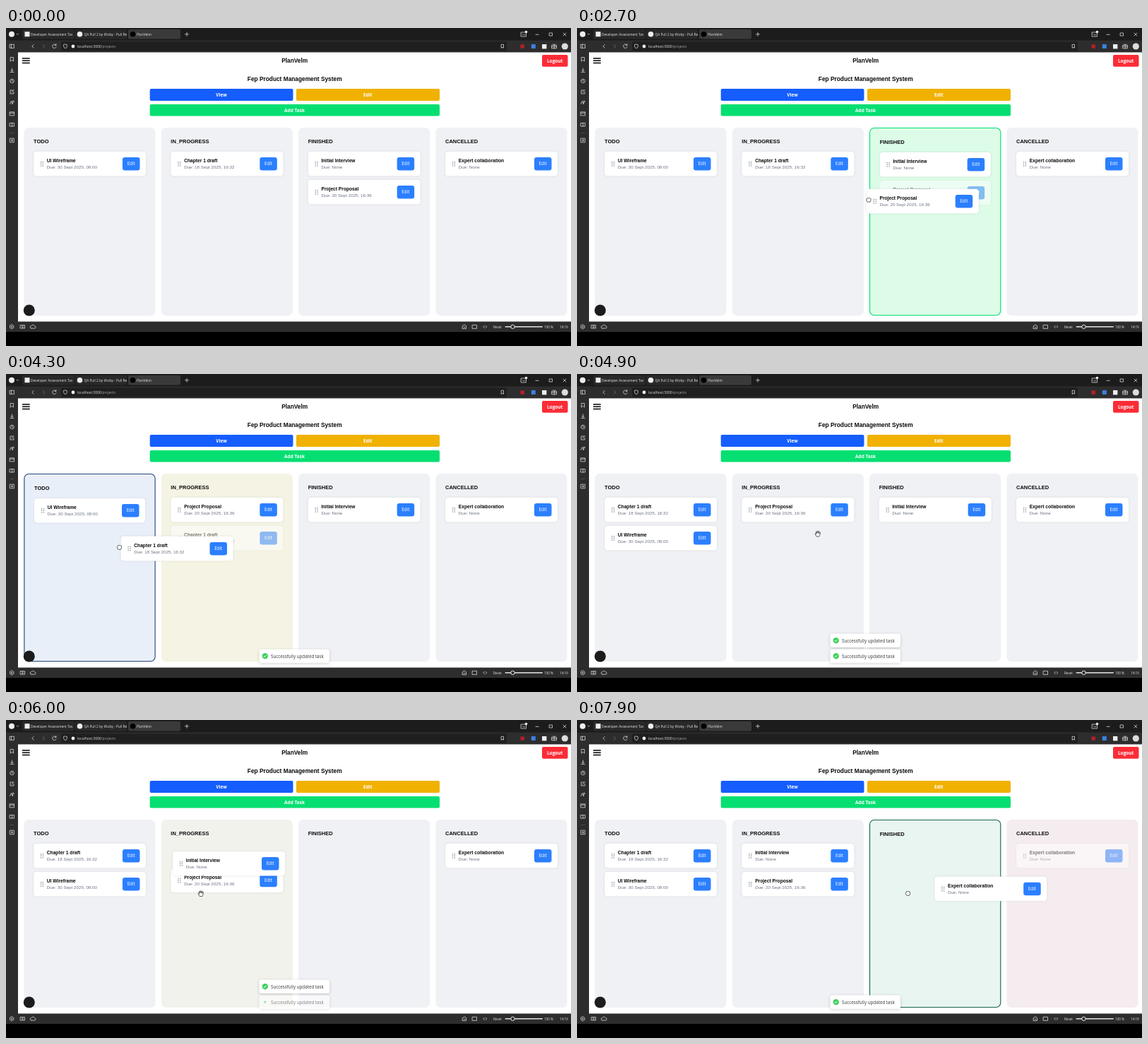
An HTML page that plays this animation: 800 by 450 pixels, repeating every 8000 ms.

```html
<!DOCTYPE html>
<html lang="en">
<head>
<meta charset="utf-8">
<title>Task board</title>
<style>
  html, body { margin: 0; width: 100%; height: 100%; overflow: hidden; background: #000; }
  svg { display: block; width: 800px; height: 450px; }
  text { font-family: "Liberation Sans", Arial, sans-serif; white-space: pre; }
  .ui text, .btn { font-family: "Open Sans", sans-serif; }
  .ui text { font-size: 5px; fill: #e4e4e4; }
  .ui .tab { font-size: 4.8px; }
  .ui .small { font-size: 4.6px; }
  .line { fill: none; stroke: #d6d6d6; stroke-width: .8; stroke-linecap: round; stroke-linejoin: round; }
  .btn { font-size: 6.28px; fill: #fff; text-anchor: middle; }
  .bold { font-size: 6.5px; font-weight: 700; }
  .head { font-size: 8.33px; font-weight: 700; text-anchor: middle; fill: #0a0a0a; }
  .name { font-size: 7.5px; font-weight: 700; fill: #0a0a0a; }
  .task { font-size: 6.67px; font-weight: 700; fill: #0a0a0a; }
  .due { font-size: 6.25px; fill: #6a7282; }
  .note { font-family: "Open Sans", sans-serif; font-size: 6.28px; fill: #363636; }
  .card { filter: drop-shadow(0 .8px 1px rgba(0,0,0,.14)); }
  .toast { filter: drop-shadow(0 1px 2px rgba(0,0,0,.18)); }
</style>
</head>
<body>
<svg id="stage" viewBox="0 0 800 450" xmlns="http://www.w3.org/2000/svg">
  <rect width="800" height="450"/>
  <g class="ui">
    <rect width="800" height="18" fill="#1c1c1c"/>
    <rect y="17.5" width="800" height="17" fill="#2d2d2d"/>
    <rect y="34" width="17" height="396" fill="#2d2d2d"/>
    <rect y="415.5" width="800" height="14.5" fill="#2d2d2d"/>
    <rect x="23" y="2" width="74" height="13.5" rx="2" fill="#292929"/>
    <rect x="98" y="2" width="73" height="13.5" rx="2" fill="#292929"/>
    <rect x="173" y="2" width="74" height="13.5" rx="2" fill="#3a3a3a"/>
    <rect x="78" y="19.5" width="631" height="13" rx="2" fill="#1f1f1f"/>

    <circle cx="8" cy="8.7" r="4" fill="#eee"/>
    <path class="line" d="M15.3 8.2l1.2 1.2 1.2-1.2"/>
    <rect x="26.5" y="5.2" width="7" height="7" fill="#eee"/>
    <text class="tab" x="35" y="10.7">Developer Assessment Tas</text>
    <circle cx="104.5" cy="8.8" r="3.8" fill="#eee"/>
    <text class="tab" x="110.5" y="10.7">QA Pull 2 by tNoby - Pull Re</text>
    <circle cx="179.5" cy="8.8" r="3.8"/>
    <text class="tab" x="185" y="10.7">PlanVelm</text>
    <path class="line" d="M253.5 8.8h5M256 6.3v5"/>
    <path class="line" d="M729.5 6h7v6h-7zM731.2 8.5l1.8 1.8 2-1.8M750 9.3h4.2M769.5 7h4v4h-4zM789 7l4 4M793 7l-4 4"/>
    <circle cx="736.5" cy="5.5" r="1.8" fill="#eee"/>

    <path class="line" d="M5.5 23.3h6v5h-6zM7.5 23.3v5M39.2 23.5l-2.4 2.4 2.4 2.4M70.7 24a2.8 2.8 0 1 0 .4 2.8M71 22.7v1.8h-1.8M84 23l2.4.8v2q0 2-2.4 3-2.4-1-2.4-3v-2z"/>
    <path class="line" style="stroke:#777" d="M52.3 23.5l2.4 2.4-2.4 2.4"/>
    <circle cx="95" cy="26" r="2.4" fill="#eee"/>
    <text x="101" y="27.8">localhost:3000<tspan fill="#a5a5a5">/projects</tspan></text>
    <path class="line" d="M701.5 23.3h3v5l-1.5-1.3-1.5 1.3z"/>
    <rect x="728.5" y="23.4" width="5.4" height="5.4" fill="#b3202a"/>
    <rect x="743.8" y="23" width="6" height="6" fill="#3d7fe0"/>
    <rect x="759" y="23" width="6.4" height="6.4" fill="#eee"/>
    <path class="line" d="M773 24.3h6.5v4.5H773zM773 26.3h6.5M776.2 24v5M774.7 22.8l1.5 1.2 1.5-1.2"/>
    <circle cx="791.3" cy="26" r="4.6" fill="#ddd"/>

    <path class="line" d="M6.5 41.5h4v5.5l-2-1.6-2 1.6z
      M8.5 57v4M6.8 59.5l1.7 1.7 1.7-1.7M6 62.5h5
      M5.7 75a2.8 2.8 0 1 0 5.6 0a2.8 2.8 0 1 0-5.6 0M8.5 73.3V75l1.2.8
      M10 88H6v5h5v-2.5M8.3 91l2.8-3.3
      M5.5 107.5l2-4 1.5 4M9 104h2.5M10 103l-.5 4.5
      M5.5 118.8h6v5h-6zM5.5 120.3h6
      M5.5 134.5h6v4.5h-6zM8.5 134.5v4.5
      M5.7 156.2h5.6v5.6H5.7zM8.5 157.7v2.6M7.2 159h2.6"/>
    <path class="line" style="stroke:#555" d="M6 148.5h5"/>

    <path class="line" d="M8.2 419.8l2.6 1.5v3l-2.6 1.5-2.6-1.5v-3zM7.3 422.8a.9.9 0 1 0 1.8 0a.9.9 0 1 0-1.8 0
      M20.5 420.5h6v4.5h-6zM22.5 422h2M22.5 423.6h2
      M36 425h4.5a1.6 1.6 0 0 0 0-3.2a2.5 2.5 0 0 0-4.5-.4a1.8 1.8 0 0 0 0 3.6
      M646.5 421.5l2.5-1.7 2.5 1.7v4h-5zM648.2 423.5h1.6
      M660.5 420.3h6v5h-6zM677.3 421.3l-1.5 1.5 1.5 1.5M679.2 421.3l1.5 1.5-1.5 1.5"/>
    <text x="690" y="424.6" class="small">Reset</text>
    <rect x="706.5" y="422" width="53.5" height="1.6" rx=".8" fill="#e4e4e4"/>
    <circle cx="717.5" cy="422.8" r="2.7" fill="#2d2d2d" stroke="#eee"/>
    <text x="762" y="424.6" class="small">100 %</text>
    <text x="784" y="424.6" class="small">14:19</text>
  </g>

  <rect x="17" y="34.4" width="783" height="381.1" fill="#fff"/>
  <path d="M23 43h10.7M23 46.2h10.7M23 49.4h10.7" stroke="#000" stroke-width="1.5"/>
  <text class="head" x="408.7" y="49.2">PlanVelm</text>
  <text class="head" x="408.7" y="75">Fep Product Management System</text>
  <rect x="759" y="38" width="36.5" height="16.7" rx="2" fill="#fb2c36"/>
  <text class="btn bold" x="777.2" y="48.8">Logout</text>
  <rect x="203.7" y="86" width="202.8" height="17" rx="2" fill="#155dfc"/>
  <text class="btn bold" x="305" y="97">View</text>
  <rect x="411" y="86" width="203" height="17" rx="2" fill="#f0b100"/>
  <text class="btn bold" x="512.3" y="97">Edit</text>
  <rect x="203.7" y="108" width="410.3" height="16.6" rx="2" fill="#05df72"/>
  <text class="btn bold" x="408.5" y="118.8">Add Task</text>

  <g id="columns"></g>
  <g id="cards"></g>
  <circle cx="32.8" cy="399.5" r="8" fill="#1c1c1c"/>
  <g id="floats"></g>
  <g id="toasts"></g>
  <g id="cursor" fill="#fff" stroke="#222" stroke-width=".7" stroke-linejoin="round">
    <path id="arrow" d="M-3-4v8l2-1.8 1.3 2.8 1.3-.6-1.3-2.7h2.7z"/>
    <path id="open" d="M-1.8 4L-3.8.8q-.4-1 .5-1l1.2 1-.7-3q.1-1 1-.6l.8 2-.1-2.700q.6-.9 1.200 0l.3 2.600.6-2.300q.8-.6 1.100.2l-.3 2.700.8-1.500q.9-.3.900.6L2.600 2.300 2 4z"/>
    <path id="fist" d="M-1.800 3.200L-3.200.9q-.2-1 .7-1.200v-1.600q.6-.9 1.400-.2q.7-.9 1.500-.1q.8-.7 1.400.2q1-.3 1.200.7v2L2.200 3.200z"/>
  </g>
</svg>
<script>
const LOOP = 8000, STEP = 100, FADE = 300, SHIFT = 230;
const $ = id => document.getElementById(id);
const clamp = v => Math.max(0, Math.min(1, v));
const show = (el, on) => el.style.display = on ? '' : 'none';
const move = (el, x, y) => el.setAttribute('transform', `translate(${x} ${y})`);

function add(parent, markup) {
  const g = document.createElementNS('http://www.w3.org/2000/svg', 'g');
  g.innerHTML = markup;
  parent.append(g);
  return g;
}

// Straight moves between [time, x, y] keys
function follow(keys, t) {
  const i = keys.findIndex(k => k[0] > t);
  if (i < 0) return keys[keys.length - 1].slice(1);
  if (i === 0) return keys[0].slice(1);
  const [a, b] = [keys[i - 1], keys[i]], p = (t - a[0]) / (b[0] - a[0]);
  return [a[1] + (b[1] - a[1]) * p, a[2] + (b[2] - a[2]) * p];
}

const colX = c => 25.4 + c * 194.33;
const slot = (c, r) => [colX(c) + 13.6, 174.7 + r * 40];

const columns = [
  ['TODO', '#dbeafe', '#2b7fff', [[4200, 4500]]],
  ['IN_PROGRESS', '#fef9c2', '#f0b100', [[2800, 3140], [4000, 4200], [5550, 5800]]],
  ['FINISHED', '#dcfce7', '#05df72', [[2300, 2800], [5300, 5550], [7800, 8100]]],
  ['CANCELLED', '#ffe2e2', '#fb2c36', [[7600, 7800]]]
].map(([name, tint, edge, spans], c) => {
  const g = add($('columns'), `<rect width="186.2" height="266" rx="6.7"/>
    <rect x=".5" y=".5" width="185.200" height="265" rx="6.2" fill="none" stroke-width="1.100"/>
    <text class="name" x="13.6" y="22">${name}</text>`);
  move(g, colX(c), 141);
  const [fill, border, label] = g.children;
  return { tint, edge, spans, fill, border, label };
});

function paintColumn(col, t) {
  let level = 0;
  col.active = false;
  for (const [on, off] of col.spans) {
    if (t < on) continue;
    const rise = clamp((Math.min(t, off) - on) / FADE);
    level = Math.max(level, rise - Math.max(0, t - off) / FADE);
    if (t < off) col.active = true;
  }
  const pct = level * 100;
  col.fill.style.fill = `color-mix(in srgb, ${col.tint} ${pct}%, #f0f1f5)`;
  col.border.style.stroke = `color-mix(in srgb, ${col.edge} ${pct}%, #1e2939)`;
  show(col.border, col.active);
  move(col.label, +col.active, +col.active);
}

const dots = [15, 17.6, 20.2].map(y => [10.6, 13.4].map(x =>
  `<circle cx="${x}" cy="${y}" r=".75" fill="#7d8590"/>`).join('')).join('');

function makeCard(parent, title, due) {
  const g = add(parent, `<rect width="159.2" height="34.8" rx="4.200" fill="#fff"/>${dots}
    <text class="task" x="18.8" y="15.3">${title}</text>
    <text class="due" x="18.8" y="24.500">Due: ${due}</text>
    <g><rect x="126" y="8.3" width="24.500" height="18.500" rx="3.300" fill="#2b7fff"/>
    <text class="btn" x="138.2" y="19.8">Edit</text></g>`);
  g.setAttribute('class', 'card');
  return g;
}

// slots: [time, column, row]; drag: [grab, drop, end, path]
const tasks = [
  { title: 'UI Wireframe', due: '30 Sept 2025, 08:00', slots: [[0, 0, 0], [4500, 0, 1]] },
  { title: 'Chapter 1 draft', due: '18 Sept 2025, 16:32',
    slots: [[0, 1, 0], [3140, 1, 1], [4500, 0, 0]],
    drag: [4000, 4500, 4750, [[4000, ...slot(1, 1)], [4300, 162.5, 229.6], [4500, 58, 205], [4750, ...slot(0, 0)]]] },
  { title: 'Initial Interview', due: 'None', slots: [[0, 2, 0], [5800, 1, 0]],
    drag: [5300, 5800, 6080, [[5300, ...slot(2, 0)], [5500, 355, 208], [5800, 260, 226], [6000, 236, 185.700], [6080, ...slot(1, 0)]]] },
  { title: 'Project Proposal', due: '20 Sept 2025, 16:36',
    slots: [[0, 2, 1], [3140, 1, 0], [5800, 1, 1]],
    drag: [2300, 3140, 3400, [[2300, ...slot(2, 1)], [2700, 409.7, 227.700], [2900, 318, 234], [3100, 246, 220], [3200, 242, 207.500], [3400, ...slot(1, 0)]]] },
  { title: 'Expert collaboration', due: 'None', slots: [[0, 3, 0]],
    drag: [7600, 8100, 8200, [[7500, ...slot(3, 0)], [7900, 506.2, 221.500]]] }
];
for (const task of tasks) {
  task.base = makeCard($('cards'), task.title, task.due);
  if (task.drag) task.float = makeCard($('floats'), task.title, task.due);
}

function paintTask({ slots, drag, base, float }, t) {
  const i = slots.filter(s => s[0] <= t).length - 1;
  const [since, c, r] = slots[i], prev = slots[i - 1];
  let [x, y] = slot(c, r);
  if (prev && prev[1] === c) y += (prev[2] - r) * 40 * (1 - clamp((t - since) / SHIFT));
  const inset = +columns[c].active;
  move(base, x + inset, y + inset);
  base.firstElementChild.setAttribute('width', 159.2 - 2 * inset);
  move(base.lastElementChild, -2 * inset, 0);
  if (!drag) return;
  const [grab, drop, end, path] = drag;
  const held = t >= grab && t < drop, flying = t >= grab && t < end;
  base.style.opacity = held ? .5 : 1;
  show(base, held || !flying);
  show(float, flying);
  move(float, ...follow(path, t));
}

// [enter, leave, pushed up]
const toasts = [[3400, 5400, 4550], [4550, 6700, 5770], [5800, 8100, 8100]].map(times => {
  const g = add($('toasts'), `<rect x="358.500" y="389.500" width="99.500" height="19.2" rx="3.2" fill="#fff"/>
    <g><circle r="4.200" fill="#3fd05c"/>
    <path d="M-1.900 0l1.300 1.500 2.500-2.900" fill="none" stroke="#fff" stroke-width="1"/></g>
    <text class="note" x="375" y="401.500">Successfully updated task</text>`);
  g.setAttribute('class', 'toast');
  return { g, icon: g.children[1], times };
});

function paintToast({ g, icon, times: [enter, leave, push] }, t) {
  const opacity = Math.min(clamp((t - enter) / 330), 1 - clamp((t - leave) / 350));
  show(g, opacity > 0);
  g.style.opacity = opacity;
  move(g, 0, -22 * clamp((t - push) / SHIFT));
  icon.setAttribute('transform', `translate(366.8 399.100) scale(${clamp((t - enter - 120) / 220)})`);
}

const pointer = [
  [1300, 743, 6], [1700, 610, 110], [2100, 455, 223], [2200, 440, 231], [2300, 439, 232],
  [2700, 413, 243], [2900, 320, 249], [3100, 260, 237], [3200, 257, 234], [3500, 250, 232],
  [4000, 245, 232], [4300, 160.500, 245], [4500, 70, 222], [4600, 85, 222], [4900, 341, 226],
  [5200, 436, 195], [5300, 439, 192], [5500, 362, 226], [5800, 274, 244], [6000, 276, 245.500],
  [6300, 450, 220], [6600, 646, 197], [7500, 634, 192], [7900, 468.500, 245]
];

function paintPointer(t) {
  show($('cursor'), t >= 1300);
  move($('cursor'), ...follow(pointer, t));
  const held = tasks.some(({ drag }) => drag && t >= drag[0] && t < drag[1]);
  show($('arrow'), t < 2200);
  show($('open'), t >= 2200 && !held);
  show($('fist'), held);
}

function paint(t) {
  columns.forEach(c => paintColumn(c, t));
  tasks.forEach(k => paintTask(k, t));
  toasts.forEach(n => paintToast(n, t));
  paintPointer(t);
}

const start = performance.now();
function tick(now) {
  const t = Math.max(0, now - start) % LOOP;
  paint(Math.floor(t / STEP) * STEP);
  requestAnimationFrame(tick);
}
paint(0);
requestAnimationFrame(tick);
</script>
</body>
</html>
```
